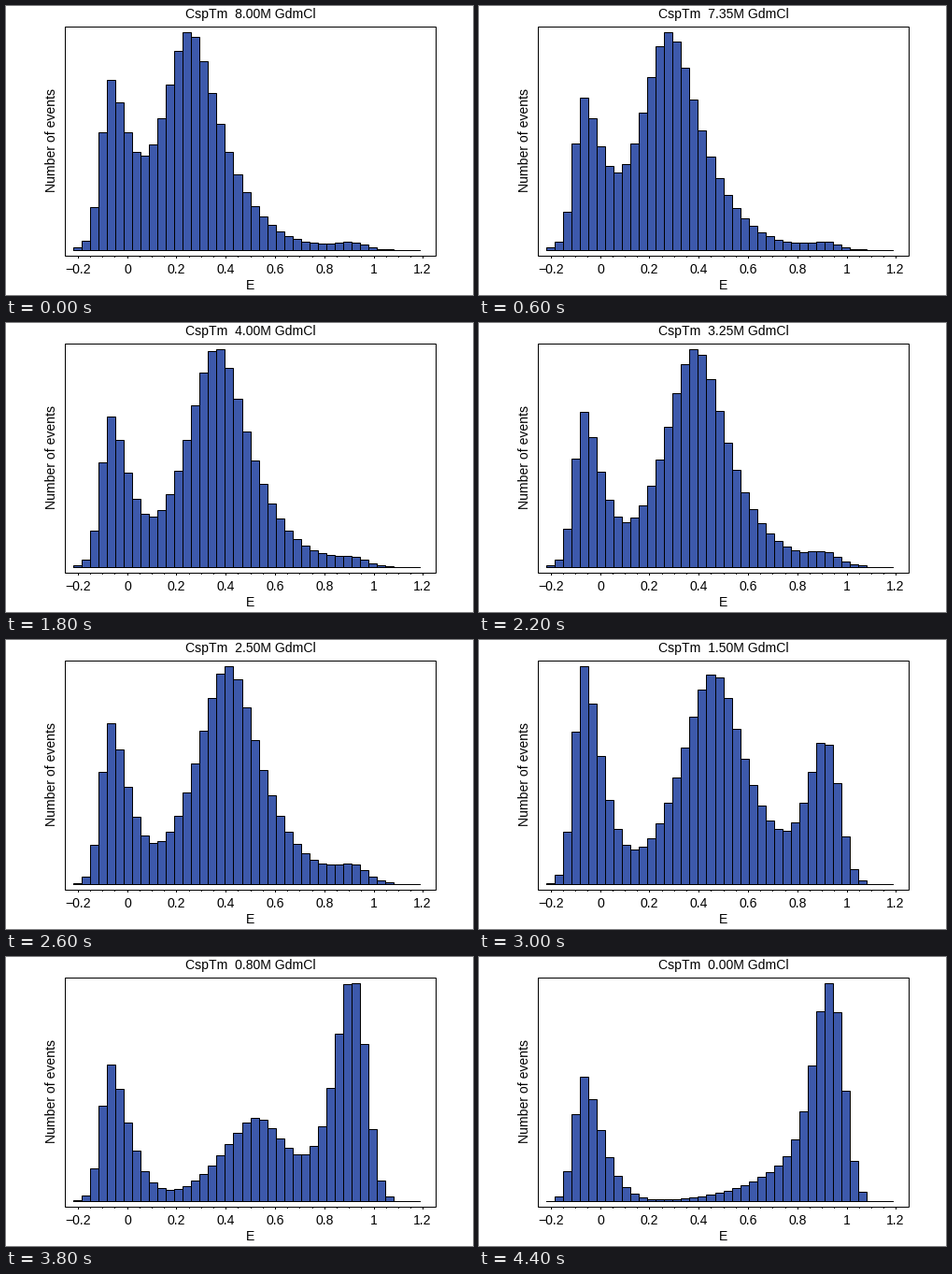
Write a matplotlib script that moves like this. It is 500 by 309 pixels and loops after 4.6 s.

```python
import numpy as np
import matplotlib.pyplot as plt
from matplotlib.animation import FuncAnimation
from matplotlib.patches import Rectangle

W, H, DPI = 500, 309, 100
PX = 72 / DPI
STEPS, INTERVAL = 23, 200
BASE, PEAK, BARS = 261, 233, 38
BLUE = "#3d59ab"

plt.rcParams["font.family"] = "Liberation Sans"
plt.rcParams["font.size"] = 14 * PX

# Key points of the three populations, positions in bins
KEYS = [0, 6, 9, 13, 15, 19, 22]
DARK = [0.72, 0.59, 0.66, 0.72, 1, 0.62, 0.59]
UNFOLDED = [1, 1, 1, 1, 0.98, 0.38, 0.11]
CENTER = [13.3, 14.9, 16.6, 17.9, 19.4, 21.3, 27]
FOLDED = [0.03, 0.03, 0.03, 0.065, 0.63, 1, 1]


def molar(step):
    """Concentration in the title, in steps of 0.05."""
    c = np.interp(step, [0, 1, 4, 5, 6, 9, 13, 15, 19, 22],
                  [8, 8, 7, 7, 6.45, 4, 2.5, 1.5, 0.8, 0])
    return round(c * 20) / 20


def power(d, scale, exponent):
    return np.exp(-scale * np.abs(d) ** exponent)


def tailed(d, slope, width):
    """Gaussian core that turns into an exponential tail."""
    return np.exp(-slope * (np.hypot(1, d / width) - 1))


def heights(step):
    def at(values):
        return np.interp(step, KEYS, values)

    k = np.arange(BARS)
    d = k - 4
    dark = np.where(d < 0, power(d, 0.36, 2), power(d, 0.2, 1.5))
    mid = at(CENTER)
    d = k - mid
    unfolded = np.where(d < 0, tailed(d, 1.6, 2 + 0.12 * mid),
                        tailed(d, 0.79, 2.7))
    d = k - np.interp(step, [19, 22], [32.5, 33])
    folded = np.where(d < 0, tailed(d, 1.3, 2), power(d, 0.14, 2.3))
    h = at(DARK) * dark + at(UNFOLDED) * unfolded + at(FOLDED) * folded
    return np.round(h * PEAK / h.max())


fig = plt.figure(figsize=(W / DPI, H / DPI), dpi=DPI, facecolor="white")
ax = fig.add_axes([0, 0, 1, 1])
ax.set_xlim(0, W)
ax.set_ylim(H, 0)
ax.axis("off")


def line(x0, y0, x1, y1):
    ax.plot([x0, x1], [y0, y1], color="black", lw=PX,
            solid_capstyle="projecting", zorder=3)


def label(x, y, text, **kw):
    return ax.text(x, y, text, ha="center", va="baseline", **kw)


def box(x0, y0, x1, y1, fill):
    return ax.add_patch(Rectangle(
        (x0, y0), x1 - x0, y1 - y0, facecolor=fill, edgecolor="black",
        lw=PX, joinstyle="miter"))


box(63, 22, 460, 267, "none")
edges = np.floor(72 + 9.05 * np.arange(BARS + 1))
bars = [box(a, BASE, b, BASE, BLUE) for a, b in zip(edges, edges[1:])]
line(72, BASE, 443, BASE)

for n in range(-4, 25):
    x = int(130 + 264 * n / 20)
    major = n % 4 == 0
    line(x, 267, x, 269 if major else 268)
    if major:
        label(x, 286, f"{n / 20:g}".replace("-", "\u2212"))

label(261.5, 303, "E")
label(53, 143.5, "Number of events", rotation=90, rotation_mode="anchor")
title = label(262, 13, "")


def draw(step):
    for bar, h in zip(bars, heights(step)):
        bar.set_y(BASE - h)
        bar.set_height(h)
    title.set_text(f"CspTm  {molar(step):.2f}M GdmCl")
    return [*bars, title]


anim = FuncAnimation(fig, draw, frames=STEPS, interval=INTERVAL,
                     repeat=True, repeat_delay=0, blit=False)
plt.show()
```
